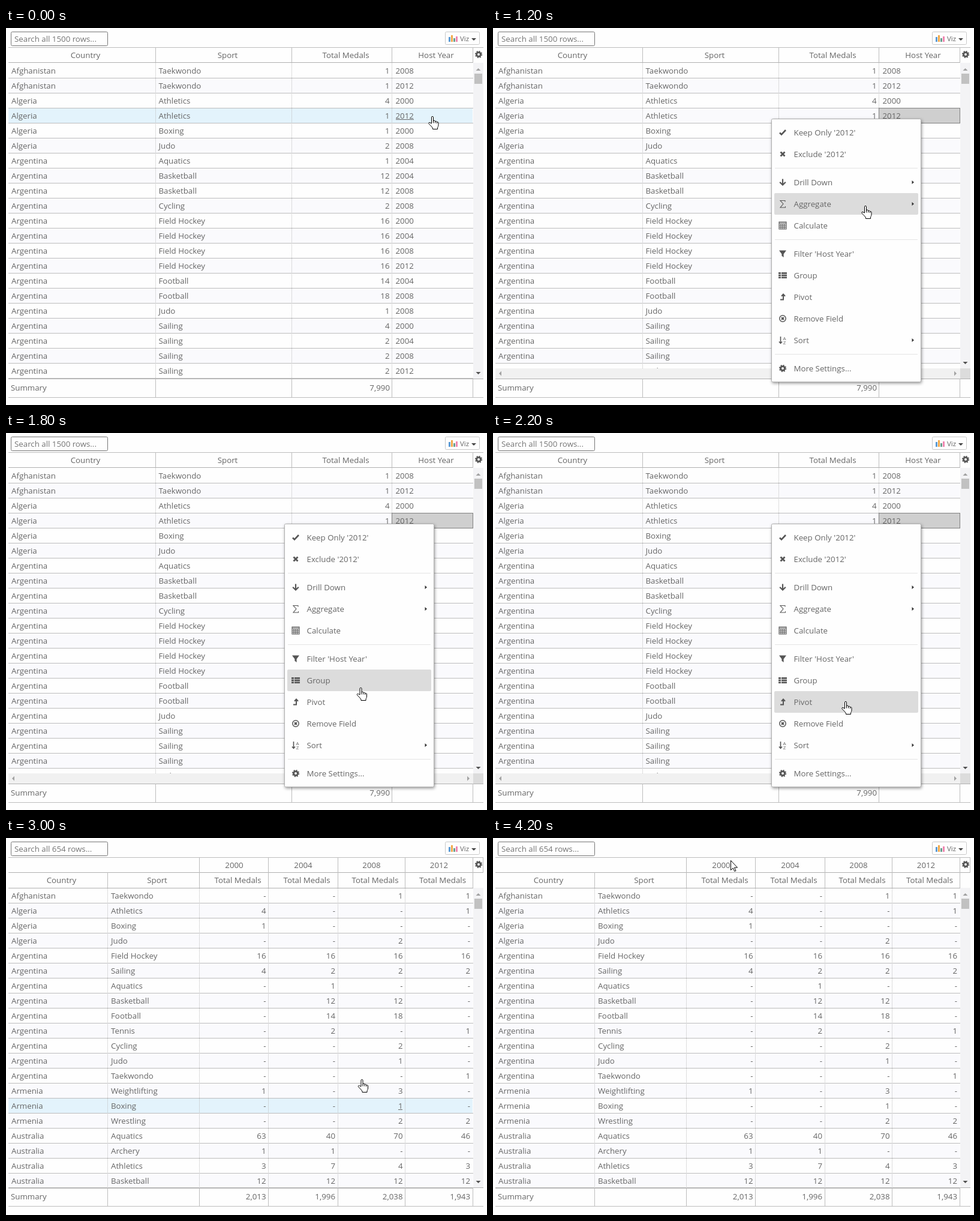
An HTML page for the animation above (5.4 s loop, 802 by 628 pixels).

```html
<!DOCTYPE html>
<html lang="en">
<head>
<meta charset="utf-8">
<title>Pivot a table column</title>
<style>
html, body { margin: 0; width: 100%; height: 100%; overflow: hidden; background: #fefefe; }
svg { display: block; width: 100%; height: 100%; }
text { font: 13.3px "Open Sans", "Noto Sans", sans-serif; fill: #666; }
.line { fill: #bdbdbd; }
.dark { fill: #b0b0b0; }
rect { shape-rendering: crispEdges; }
rect.soft { shape-rendering: auto; }
.dots { stroke: #bcbcbc; stroke-dasharray: 1 1; shape-rendering: crispEdges; }
.panel { filter: drop-shadow(1px 2px 2.5px rgba(0, 0, 0, .4)); }
.icon { fill: none; stroke: #555; }
.solid { fill: #555; stroke: none; }
.pointer { fill: #fff; stroke: #000; stroke-linejoin: round; }
</style>
</head>
<body>
<svg id="stage" viewBox="0 0 802 628" xmlns="http://www.w3.org/2000/svg"></svg>
<script>
const LOOP = 5400;
const BG = '#fefefe';

// ---- drawing helpers ----
const text = (x, y, s, anchor = 'start', extra = '') =>
  `<text x="${x}" y="${y}" text-anchor="${anchor}" ${extra}>${s}</text>`;
const box = (x, y, w, h, fill, extra = '') =>
  `<rect x="${x}" y="${y}" width="${w}" height="${h}" fill="${fill}" ${extra}/>`;
const hline = (x1, x2, y, kind = 'line') => box(x1, y, x2 - x1, 1, '', `class="${kind}"`);
const vline = (x, y1, y2) => box(x, y1, 1, y2 - y1, '', 'class="line"');
const dotted = (x, y1, y2) =>
  `<line class="dots" x1="${x + .5}" x2="${x + .5}" y1="${y1}" y2="${y2}"/>`;
const path = (d, extra = '') => `<path d="${d}" ${extra}/>`;
const group = (id, body, extra = '') => `<g id="${id}" ${extra}>${body}</g>`;
const frame = (x, y, w, h, stroke, r) =>
  `<rect class="soft" x="${x + .5}" y="${y + .5}" width="${w - 1}" height="${h - 1}" rx="${r}" fill="${BG}" stroke="${stroke}"/>`;
const at = (x, y, body) => `<g transform="translate(${x} ${y})">${body}</g>`;
const tri = (x, y, dir, color) => {
  const shape = { up: 'M-4 2L0-2L4 2Z', down: 'M-4-2L0 2L4-2Z', left: 'M2-4L-2 0L2 4Z', right: 'M-2-4L2 0L-2 4Z' }[dir];
  return at(x, y, path(shape, `fill="${color}"`));
};
const gear = `<circle class="icon" r="3.4" stroke-width="2.8"/>
  <circle class="icon" r="5.2" stroke-width="1.9" stroke-dasharray="2.04"/>`;

// ---- table parts ----
const stripes = (top, count) => Array.from({ length: count }, (_, i) =>
  (i % 2 ? box(4, top + 25 * i, 774, 24, '#fafafd') : '') + hline(4, 779, top + 25 * i + 24)).join('');

const hover = (id, x, w) => group(id,
  box(4, 0, 774, 24, '#e3f3fc') + box(x, 18, w, 1, '#666'));

const scrollbar = (top, bottom) =>
  box(779, top, 17, bottom - top, '#f3f3f5') +
  box(781, top + 18, 13, 17, '#c1c1c1') +
  tri(787.5, top + 11, 'up', '#a0a0a0') +
  tri(787.5, bottom - 9, 'down', '#505050');

const footer = (top, height, cols, ends, sums) =>
  hline(4, 796, top, 'dark') + hline(4, 796, top + height) +
  cols.map(x => vline(x, top, top + height)).join('') +
  text(8, top + 20, 'Summary') +
  sums.map((s, i) => text(ends[i], top + 20, s, 'end')).join('');

function rawTable() {
  const rows = `Afghanistan,Taekwondo,1,2008;Afghanistan,Taekwondo,1,2012;Algeria,Athletics,4,2000
Algeria,Athletics,1,2012;Algeria,Boxing,1,2000;Algeria,Judo,2,2008;Argentina,Aquatics,1,2004
Argentina,Basketball,12,2004;Argentina,Basketball,12,2008;Argentina,Cycling,2,2008
Argentina,Field Hockey,16,2000;Argentina,Field Hockey,16,2004;Argentina,Field Hockey,16,2008
Argentina,Field Hockey,16,2012;Argentina,Football,14,2004;Argentina,Football,18,2008
Argentina,Judo,1,2008;Argentina,Sailing,4,2000;Argentina,Sailing,2,2004
Argentina,Sailing,2,2008;Argentina,Sailing,2,2012`.split(/[;\n]/).map(r => r.split(','));
  const cols = [249, 476, 643, 778];
  const heads = [[132.5, 'Country'], [369.5, 'Sport'], [566.5, 'Total Medals'], [717, 'Host Year']];
  return stripes(59, 21) + hover('rawHover', 650, 30) +
    hline(4, 796, 32) + hline(4, 779, 57, 'dark') +
    cols.map(x => vline(x, 32, 58)).join('') +
    heads.map(([x, s]) => text(x, 50, s, 'middle')).join('') +
    cols.slice(0, 3).map(x => dotted(x, 58, 584)).join('') +
    group('picked', box(643.5, 133.5, 135, 25, '#cfcfcf', 'stroke="#808080"')) +
    rows.map(([land, sport, n, year], i) => {
      const y = 76 + 25 * i;
      return text(9, y, land) + text(254.5, y, sport) + text(639.5, y, n, 'end') + text(649.5, y, year);
    }).join('') +
    scrollbar(58, 584) + at(788, 44, gear) +
    footer(584, 31, cols, [640], ['7,990']);
}

function pivotTable() {
  const rows = `Afghanistan,Taekwondo,- - 1 1;Algeria,Athletics,4 - - 1;Algeria,Boxing,1 - - -
Algeria,Judo,- - 2 -;Argentina,Field Hockey,16 16 16 16;Argentina,Sailing,4 2 2 2
Argentina,Aquatics,- 1 - -;Argentina,Basketball,- 12 12 -;Argentina,Football,- 14 18 -
Argentina,Tennis,- 2 - 1;Argentina,Cycling,- - 2 -;Argentina,Judo,- - 1 -
Argentina,Taekwondo,- - - 1;Armenia,Weightlifting,1 - 3 -;Armenia,Boxing,- - 1 -
Armenia,Wrestling,- - 2 2;Australia,Aquatics,63 40 70 46;Australia,Archery,1 1 - -
Australia,Athletics,3 7 4 3;Australia,Basketball,12 12 12 12`.split(/[;\n]/).map(r => r.split(','));
  const cols = [169, 322, 437, 553, 665, 778];
  const ends = [433.5, 549, 661.5, 774];
  const years = [[380.5, 2000], [495.5, 2004], [609.5, 2008], [722, 2012]];
  return stripes(84, 20) + hover('pivotHover', 654, 7) +
    hline(4, 796, 32) + hline(4, 796, 57, 'dark') + hline(4, 779, 83, 'dark') +
    cols.map((x, i) => vline(x, i ? 32 : 57, 83)).join('') + vline(795, 32, 58) +
    years.map(([x, s]) => text(x, 50, s, 'middle') + text(x + 6, 75, 'Total Medals', 'middle')).join('') +
    text(92.5, 75, 'Country', 'middle') + text(252, 75, 'Sport', 'middle') +
    cols.slice(0, 5).map(x => dotted(x, 84, 583)).join('') +
    rows.map(([land, sport, counts], i) => {
      const y = 101 + 25 * i;
      return text(9, y, land) + text(175, y, sport) +
        counts.split(' ').map((n, k) => text(ends[k], y, n, 'end')).join('');
    }).join('') +
    scrollbar(83, 582) + at(788, 44, gear) +
    footer(582, 31, cols, ends, ['2,013', '1,996', '2,038', '1,943']);
}

// ---- menus ----
const stroke = (d, w) => path(d, `class="icon" stroke-width="${w}"`);
const fill = d => path(d, 'class="solid"');
const icons = {
  check: stroke('M-5 .5L-2 3.5L5-4', 2.6),
  cross: stroke('M-3.5-3.5L3.5 3.5M3.5-3.5L-3.5 3.5', 2.8),
  down: stroke('M0-5.5V4M-4.8-.3L0 4.5L4.8-.3', 2.2),
  sigma: stroke('M4-3.5V-5.5H-4L1 0L-4 6H4.5V4', 1.1),
  calc: stroke('M-6-6H6V6H-6ZM-6-2.5H6M-6 .5H6M-6 3.3H6M-3-2.5V6M0-2.5V6M3-2.5V6', 1.1) + stroke('M-6-4.8H6', 1),
  funnel: fill('M-6-5.5H6L1.6 .5V6L-1.6 3.5V.5Z'),
  list: [-5, -1.3, 2.4].map(y => fill(`M-7 ${y}h4v2.7h-4zM-2 ${y}h9v2.7h-9z`)).join(''),
  turn: stroke('M-4 4.5H1V-3M-2-1.3L1-4.5L4-1.3', 2),
  remove: '<circle class="icon" r="5.2" stroke-width="1.5"/>' + stroke('M-2-2L2 2M2-2L-2 2', 2),
  sort: stroke('M-3.5-6V5M-6 2.5L-3.5 5.3L-1 2.5', 1.6) +
    text(.5, -.5, 'A', 'start', 'style="font-size:8px"') + text(.8, 7, 'Z', 'start', 'style="font-size:8px"'),
  gear
};
const item = (x, y, label, icon, more) =>
  text(x + 18.5, y + 5, label) + (icon ? at(x, y, icons[icon]) : '') +
  (more ? path(`M698.5 ${y - 3}l3.5 3l-3.5 3z`, 'fill="#333"') : '');

function menu() {
  const items = [
    [174, "Keep Only '2012'", 'check'], [210, "Exclude '2012'", 'cross'],
    [257, 'Drill Down', 'down', 1], [293, 'Aggregate', 'sigma', 1], [329, 'Calculate', 'calc'],
    [376, "Filter 'Host Year'", 'funnel'], [412, 'Group', 'list'], [448, 'Pivot', 'turn'],
    [484, 'Remove Field', 'remove'], [520, 'Sort', 'sort', 1], [567, 'More Settings...', 'gear']
  ];
  return `<g class="panel">${frame(464, 151, 250, 439, '#b0b0b0', 2)}</g>` +
    box(469, 0, 240, 36, '#dcdcdc', 'id="itemHover" class="soft" rx="2"') +
    [233, 352, 543].map(y => box(470, y, 238, 1, '#e4e4e4')).join('') +
    items.map(([y, label, icon, more]) => item(483, y, label, icon, more)).join('');
}

function submenu() {
  const items = [[293, 'Min'], [329, 'Max'], [365, 'Count'], [401, 'Count Distinct'],
    [437, 'None', 'check'], [484, 'Advanced...']];
  return `<g class="panel">${frame(708, 270, 180, 237, '#b0b0b0', 2)}</g>` +
    box(714, 460, 100, 1, '#e4e4e4') +
    items.map(([y, label, icon]) => item(727, y, label, icon)).join('');
}

// Scrollbars that show while the menu is open
const innerBar = box(779, 540, 17, 27, '#f3f3f5') + tri(787.5, 558, 'down', '#505050') +
  box(4, 567, 775, 17, '#f1f1f1') + box(779, 567, 17, 17, '#dcdcdc') +
  tri(12, 575.5, 'left', '#a3a3a3') + tri(771, 575.5, 'right', '#a3a3a3');
const pageBar = box(0, 601, 802, 27, BG) + box(0, 620, 802, 8, '#f1f1f1') +
  box(0, 622, 656, 6, '#c1c1c1') + tri(795, 627, 'right', '#505050');

const bars = [[738, 15, '#5b9bd5'], [742, 12, '#f0a848'], [746, 17, '#6a9f8e'], [750, 14, '#ee86b0']];
const toolbar = frame(8, 6, 162, 24, '#767676', 2) +
  text(14, 23, '', 'start', 'id="search" style="fill:#757575"') +
  frame(732, 6, 58, 22, '#c8c8c8', 2) +
  bars.map(([x, y, c]) => box(x, y, 3, 23 - y, c)).join('') +
  text(757, 22, 'Viz', 'start', 'style="font-size:11.5px"') +
  path('M776 17h8l-4 4z', 'fill="#444"');

const arrow = path('M.5.5V16.5L4.2 13L6.8 18.5L9 17.5L6.5 12.2H11.5Z', 'class="pointer"');
const hand = path('M-.5 12V1.8a1.5 1.5 0 0 1 3 0V8c.3-1.4 2.9-1.2 3 .4V9c.4-1.2 2.7-1 2.9 .5v.6c.5-1 2.6-.8 2.6 .9V15c0 2-1.5 3-1.5 5V21.5H1.5V20C.5 17.5-3.5 14.5-5 12.3c-.8-1.3 .6-2.6 2-1.6Z', 'class="pointer"') +
  path('M2.5 8V11.5M5.5 9V11.5M8.4 10V12', 'class="pointer"');

const stage = document.getElementById('stage');
stage.innerHTML = box(0, 0, 802, 628, BG) + toolbar +
  group('raw', rawTable()) + group('inner', innerBar) + group('page', pageBar) +
  group('menu', menu()) + group('sub', submenu()) + group('pivot', pivotTable()) +
  group('arrow', arrow) + group('hand', hand);

// ---- timeline: start, scene, pointer, x, y, top of hovered row or item ----
const steps = [
  [0, 'raw', 'hand', 710, 147, 134],
  [600, 'menu', 'arrow', 711, 147],
  [800, 'menu', 'arrow', 710, 147],
  [1000, 'menu', 'arrow', 709, 147],
  [1200, 'menu', 'hand', 620, 296, 275],
  [1400, 'sub', 'hand', 614.5, 299, 275],
  [1600, 'menu', 'hand', 602, 364, 358],
  [1800, 'menu', 'hand', 590.5, 424, 394],
  [2000, 'menu', 'hand', 588, 447, 430],
  [2200, 'menu', 'hand', 587, 447, 430],
  [2400, 'menu', 'hand', 586.5, 446, 430],
  [2600, 'load', 'arrow', 587, 446],
  [2800, 'pivot', 'arrow', 587, 446],
  [3000, 'pivot', 'hand', 592.5, 402, 434],
  [3200, 'pivot', 'hand', 566, 240, 234],
  [3400, 'pivot', 'arrow', 536, 72],
  [3600, 'pivot', 'arrow', 522, 52],
  [3800, 'pivot', 'arrow', 516, 43],
  [4000, 'pivot', 'arrow', 404, 37],
  [4200, 'pivot', 'arrow', 396, 37]
];
const el = id => document.getElementById(id);
const show = (id, on) => { el(id).style.display = on ? '' : 'none'; };

function pose([, scene, pointer, x, y, top]) {
  const open = scene === 'menu' || scene === 'sub';
  const over = top !== undefined;
  show('raw', scene === 'raw' || open);
  show('pivot', scene === 'pivot');
  for (const id of ['inner', 'menu', 'picked']) show(id, open);
  for (const id of ['sub', 'page']) show(id, scene === 'sub');
  show('rawHover', over && scene === 'raw');
  show('pivotHover', over && scene === 'pivot');
  show('itemHover', over && open);
  if (over) {
    el('itemHover').setAttribute('y', top);
    for (const id of ['rawHover', 'pivotHover']) el(id).setAttribute('transform', `translate(0 ${top})`);
  }
  for (const id of ['arrow', 'hand']) show(id, id === pointer);
  el(pointer).setAttribute('transform', `translate(${x} ${y})`);
  el('search').textContent = `Search all ${scene === 'raw' || open ? 1500 : 654} rows...`;
}

const start = performance.now();
let current;
function tick() {
  const t = (performance.now() - start) % LOOP;
  const step = steps.findLast(s => s[0] <= t) || steps[0];
  if (step !== current) pose(current = step);
  requestAnimationFrame(tick);
}
tick();
</script>
</body>
</html>
```
